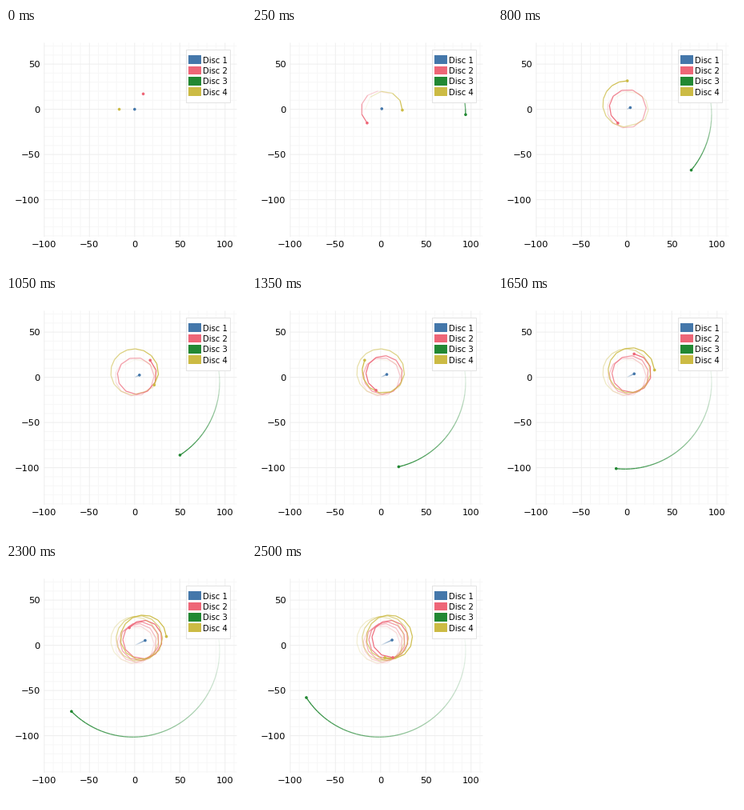
Write a matplotlib script that moves like this. It is 300 px wide and 300 px high and loops after 2550 ms.

```python
import numpy as np
import matplotlib.pyplot as plt
from matplotlib.animation import FuncAnimation
from matplotlib.collections import LineCollection
from matplotlib.colors import to_rgba
from matplotlib.patches import Circle, Rectangle

SIZE, DPI = 300, 100
FRAMES, INTERVAL = 51, 50
PT = 72 / DPI  # points per pixel
SCALE, X0, Y0 = 1.13, 160.8, 101.6
COLORS = ["#4477aa", "#ee6677", "#228833", "#ccbb44"]


def to_px(points):
    return np.array([X0, Y0]) + np.asarray(points) * [SCALE, -SCALE]


def kepler(mean, peri, ecc, latus, sense=1):
    """Points on an ellipse about its focus; angles in degrees."""
    mean = np.radians(mean)
    anomaly = mean
    for _ in range(40):
        anomaly = mean + ecc * np.sin(anomaly)
    nu = 2 * np.arctan2(np.sqrt(1 + ecc) * np.sin(anomaly / 2),
                        np.sqrt(1 - ecc) * np.cos(anomaly / 2))
    r = latus / (1 + ecc * np.cos(nu))
    theta = sense * (nu + np.radians(peri))
    return np.column_stack([r * np.cos(theta), r * np.sin(theta)])


t = np.arange(FRAMES)
sun = np.outer(t, [0.253, 0.116])
inner = sun + kepler(22 + 36.4 * t - 0.021 * t ** 2, 35 - 2.2 * t, 0.08, 20.9)
outer = kepler(50.2 + 3.78 * t - 0.0072 * t ** 2, -72, 0.061, 95.6, -1)

# The fourth disc changes orbit when it passes the second one closely.
before = kepler(37 * t, -180, 0.145, 19.5, -1)
wobble = 14 * np.cos(2 * np.pi * (t - 25) / 34)
after = kepler(25.6 * t - 181 - wobble, 35 + t, 0.28 - 0.0026 * t, 23.8, -1)
retrograde = sun + np.where(t[:, None] < 7, before, after)

paths = [to_px(p) for p in (sun, inner, outer, retrograde)]

fig = plt.figure(figsize=(SIZE / DPI, SIZE / DPI), dpi=DPI, facecolor="white")
ax = fig.add_axes([0, 0, 1, 1])
ax.set_xlim(0, SIZE)
ax.set_ylim(SIZE, 0)
ax.axis("off")


def label(x, y, text, size, ha):
    ax.text(x, y, text, fontsize=size * PT, family="DejaVu Sans", ha=ha,
            va="center_baseline", color="black", zorder=12)


def draw_grid():
    left, right, top, bottom = 48, 288, 19, 260.5
    for v in range(-140, 111, 10):
        major = v % 50 == 0
        style = dict(color="#eeeeee" if major else "#f7f7f7", lw=PT,
                     snap=False, zorder=2 if major else 1)
        x, y = to_px((v, v))
        if v >= -100:
            ax.plot([x, x], [top, bottom], **style)
        if v <= 70:
            ax.plot([left, right], [y, y], **style)
    for v in range(-100, 101, 50):
        text = str(v).replace("-", "\u2212")
        x, y = to_px((v, v))
        label(x, 270, text, 11.5, "center")
        if v <= 50:
            label(42.5, y, text, 11.5, "right")


def draw_legend():
    ax.add_patch(Rectangle((225, 27), 55, 65.5, fc="white", ec="#dddddd",
                           lw=0.8 * PT, zorder=10))
    for i, color in enumerate(COLORS):
        y = 39.8 + 13.2 * i
        ax.add_patch(Rectangle((228, y - 5.4), 16, 10.8, fc=color, lw=0,
                               zorder=11))
        label(246, y + 0.2, f"Disc {i + 1}", 10, "left")


draw_grid()
draw_legend()

trails, discs = [], []
for i, color in enumerate(COLORS):
    trail = LineCollection([], linewidths=1.25 * PT, zorder=4 + 0.1 * i)
    ax.add_collection(trail, autolim=False)
    trails.append(trail)
    disc = Circle(paths[i][0], 1.8, fc=color, lw=0, zorder=5 + 0.1 * i)
    ax.add_patch(disc)
    discs.append(disc)


def update(n):
    fade = (np.arange(n) + 0.5) / max(n, 1)
    for path, color, trail, disc in zip(paths, COLORS, trails, discs):
        trail.set_segments([path[k:k + 2] for k in range(n)])
        trail.set_color([to_rgba(color, a) for a in fade])
        disc.center = tuple(path[n])
    return trails + discs


anim = FuncAnimation(fig, update, frames=FRAMES, interval=INTERVAL,
                     repeat=True, repeat_delay=0, blit=False)
plt.show()
```
